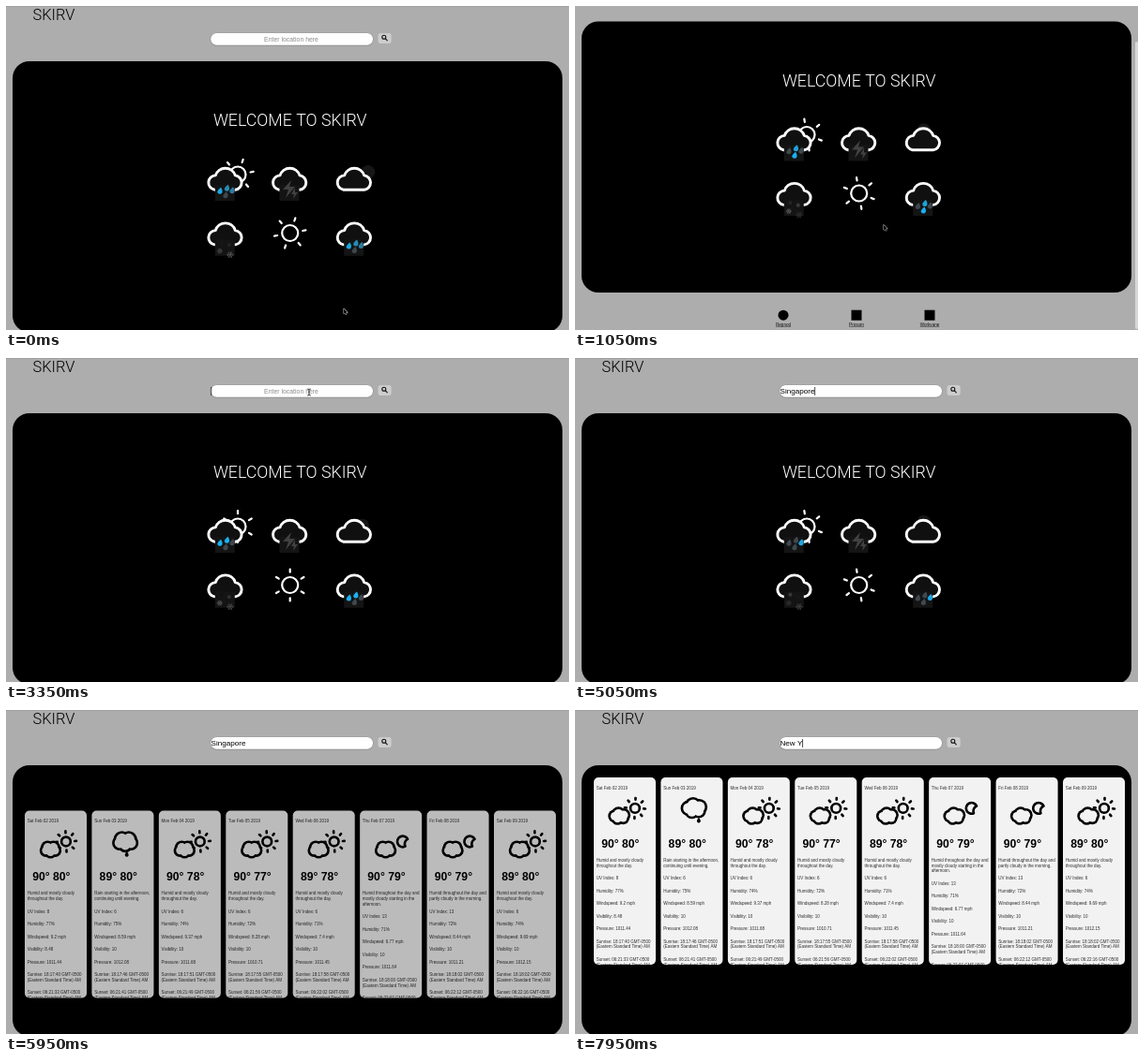
Recreate the animation shown at these times as an HTML page with a canvas. Size 600x346 px, loop 8000 ms.

```html
<!DOCTYPE html>
<html lang="en">
<head>
<meta charset="utf-8">
<title>Weather search</title>
<style>
html, body { margin: 0; width: 100%; height: 100%; overflow: hidden; background: #adadad; }
canvas { display: block; width: 600px; height: 346px; }
</style>
</head>
<body>
<canvas id="stage"></canvas>
<script>
const LOOP = 8000, TAU = Math.PI * 2;
const SANS = '"Liberation Sans", Arial, sans-serif', LIGHT = 'Roboto, sans-serif';
const NAME = 'SKIRV';
const canvas = document.getElementById('stage');
const ratio = window.devicePixelRatio || 1;
canvas.width = 600 * ratio;
canvas.height = 346 * ratio;
const ctx = canvas.getContext('2d');

const CLEAR = ['Humid and mostly cloudy', 'throughout the day.'];
const DAYS = [
  // date, icon, high, low, summary, uv, humidity, wind, visibility, pressure, sunrise, sunset
  ['Sat Feb 02', 'sun', 90, 80, CLEAR, 8, 77, 9.2, 8.48, 1011.44, '17:40', '21:33'],
  ['Sun Feb 03', 'rain', 89, 80, ['Rain starting in the afternoon,', 'continuing until evening.'], 6, 75, 8.59, 10, 1012.08, '17:46', '21:41'],
  ['Mon Feb 04', 'sun', 90, 78, CLEAR, 6, 74, 9.37, 10, 1011.68, '17:51', '21:49'],
  ['Tue Feb 05', 'sun', 90, 77, CLEAR, 6, 72, 8.28, 10, 1010.71, '17:55', '21:56'],
  ['Wed Feb 06', 'sun', 89, 78, CLEAR, 6, 71, 7.4, 10, 1011.45, '17:58', '22:02'],
  ['Thu Feb 07', 'moon', 90, 79, ['Humid throughout the day and', 'mostly cloudy starting in the', 'afternoon.'], 13, 71, 6.77, 10, 1011.64, '18:00', '22:07'],
  ['Fri Feb 08', 'moon', 90, 79, ['Humid throughout the day and', 'partly cloudy in the morning.'], 13, 72, 8.44, 10, 1011.21, '18:02', '22:12'],
  ['Sat Feb 09', 'sun', 89, 80, CLEAR, 6, 74, 9.69, 10, 1012.15, '18:02', '22:16'],
];

const clamp = (v, lo = 0, hi = 1) => Math.min(hi, Math.max(lo, v));
const smooth = (t, from, to) => { const p = clamp((t - from) / (to - from)); return p * p * (3 - 2 * p); };

// cubic-bezier(.25, .1, .25, 1)
function ease(x) {
  let lo = 0, hi = 1;
  for (let i = 0; i < 20; i++) {
    const u = (lo + hi) / 2;
    if (.75 * u * (1 - u) + u * u * u < x) lo = u; else hi = u;
  }
  return .3 * lo * (1 - lo) ** 2 + 3 * lo * lo * (1 - lo) + lo ** 3;
}

function text(str, x, y, font, color, align = 'left') {
  ctx.font = font;
  ctx.fillStyle = color;
  ctx.textAlign = align;
  ctx.fillText(str, x, y);
}
function box(x, y, w, h, r, color) {
  ctx.beginPath();
  ctx.roundRect(x, y, w, h, r);
  ctx.fillStyle = color;
  ctx.fill();
}
function disc(x, y, r, color) {
  ctx.beginPath();
  ctx.arc(x, y, r, 0, TAU);
  ctx.fillStyle = color;
  ctx.fill();
}
function pen(color, width, cap = 'round') {
  ctx.strokeStyle = color;
  ctx.lineWidth = width;
  ctx.lineCap = cap;
  ctx.lineJoin = 'round';
}
function at(x, y, draw) {
  ctx.save();
  ctx.translate(x, y);
  draw();
  ctx.restore();
}
function sunShape(x, y, r, inner, outer, count, turn) {
  ctx.beginPath();
  ctx.arc(x, y, r, 0, TAU);
  for (let i = 0; i < count; i++) {
    const a = turn + i / count * TAU, c = Math.cos(a), s = Math.sin(a);
    ctx.moveTo(x + c * inner, y + s * inner);
    ctx.lineTo(x + c * outer, y + s * outer);
  }
  ctx.stroke();
}

// Welcome icons
const CLOUD = new Path2D('M-11 9.2A7.7 7.7 0 0 1-10-6.1A11 11 0 0 1 11-6.1A7.7 7.7 0 0 1 11 9.2Z');
const DROP = new Path2D('M1.2-4.2C2.6-1.8 3.1-.6 2.6 1.2A2.8 2.8 0 0 1-2.6.8C-2.4-1-.8-2.4 1.2-4.2Z');
const BOLT = new Path2D('M2-1L-7 9H-1L-4 18L6 6H0ZM6 7L2 14H5L4 19L9 12H6Z');
// x, y, pulse centre, pulse width
const DROPS = [[-5.5, 11, 300, 500], [2, 8, 600, 700], [7.5, 10.5, 2400, 600], [.5, 15.5, 1200, 500]];
const FLAKES = [[-5.5, 16, 2.7], [5.5, 20, 3.4], [-4, 7, 1.8], [4.5, 9.5, 1.8]];

function cloud() {
  ctx.fillStyle = '#101010';
  ctx.fill(CLOUD);
  pen('#fff', 2.9);
  ctx.stroke(CLOUD);
}
function tray() {
  ctx.fillStyle = '#141414';
  ctx.fillRect(-10.5, 4, 21, 17);
}
function whiteSun(x, y, t) {
  pen('#fff', 2.2);
  sunShape(x, y, 8.5, 13.8, 17, 6, (19.5 + 30 * t / 1000 - 90) / 360 * TAU);
}
function rainCloud(t) {
  cloud();
  tray();
  for (const [x, y, peak, width] of DROPS) {
    const gap = Math.abs((t - peak + 4500) % 3000 - 1500);
    const level = clamp(1.5 - gap / width);
    at(x, y, () => {
      ctx.fillStyle = `rgb(${62 - 36 * level},${72 + 104 * level},${78 + 162 * level})`;
      ctx.fill(DROP);
    });
  }
}
function snowCloud(t) {
  cloud();
  tray();
  FLAKES.forEach(([x, y, r], i) => {
    const level = 50 + 22 * Math.sin(t / 3000 * TAU + i * 2) + (i < 2 ? 20 : -8);
    pen(`rgb(${level},${level},${level})`, .7);
    ctx.beginPath();
    for (let k = 0; k < 6; k++) {
      const c = Math.cos(k * TAU / 6), s = Math.sin(k * TAU / 6);
      ctx.moveTo(x, y);
      ctx.lineTo(x + c * r, y + s * r);
      ctx.moveTo(x + c * r * .7 - s * .8, y + s * r * .7 + c * .8);
      ctx.lineTo(x + c * r * .7 + s * .8, y + s * r * .7 - c * .8);
    }
    ctx.stroke();
  });
}
function welcome(t) {
  text('WELCOME TO ' + NAME, 302.7, 128, '300 17.8px ' + LIGHT, '#fff', 'center');
  whiteSun(247, 180, t);
  at(233.3, 187, () => rainCloud(t));
  at(302, 187, () => {
    cloud();
    tray();
    ctx.fillStyle = '#414141';
    ctx.fill(BOLT);
  });
  const orbit = t / 4000 * TAU;
  disc(372.7 + 13 * Math.cos(orbit), 177.5 - 2 * Math.sin(orbit), 7.5, '#161616');
  at(370.7, 187, cloud);
  at(233.3, 245.7, () => snowCloud(t));
  whiteSun(302.7, 242.5, t);
  at(370.7, 245.7, () => rainCloud(t));
}

// Forecast icons, drawn in a 66 by 33 area
const CARD = '#f2f2f2', SIZE = 33, LINE = SIZE * .08;

function puffs(t, x, y, w, inset, color) {
  const small = w * .24 - inset, grow = w * .04;
  for (let i = 0; i < 5; i++) {
    const a = (t / 30000 + i / 5) * TAU, c = Math.cos(a), s = Math.sin(a);
    disc(x - s * w * .21, y + c * w * .12 + grow / 2, small + (1 - c * .5) * grow, color);
  }
}
function puffCloud(t, x, y, w) {
  puffs(t, x, y, w, 0, '#000');
  puffs(t, x, y, w, LINE, CARD);
}
function moon(t, x, y, w) {
  const r = w * .29 - LINE / 2, c = Math.cos(t / 15000 * TAU), a = -c * TAU / 16;
  x += c * w * .05;
  ctx.beginPath();
  ctx.arc(x, y, r, a + TAU / 8, a + TAU * 7 / 8);
  ctx.arc(x + Math.cos(a) * r * Math.SQRT2, y + Math.sin(a) * r * Math.SQRT2, r, a + TAU * 5 / 8, a + TAU * 3 / 8, true);
  ctx.closePath();
  ctx.stroke();
}
function rainDrops(t, x, y, w) {
  ctx.fillStyle = '#000';
  [-1, 1 / 3, -1 / 3, 1].forEach((side, i) => {
    const p = (t / 1350 + i / 4) % 1, dx = x + side * w * .16, dy = y + p * p * w;
    ctx.beginPath();
    ctx.moveTo(dx, dy - LINE * 1.5);
    ctx.arc(dx, dy, LINE * .75, TAU * 11 / 12, TAU * 7 / 12);
    ctx.fill();
  });
}
function forecastIcon(kind, t) {
  ctx.beginPath();
  ctx.rect(0, 0, 66, SIZE);
  ctx.clip();
  pen('#000', LINE);
  const w = SIZE * .75;
  if (kind === 'rain') {
    rainDrops(t, 33, SIZE * .37, SIZE * .9);
    puffCloud(t, 33, SIZE * .37, SIZE * .9);
    return;
  }
  if (kind === 'sun') {
    sunShape(66 * .625, SIZE * .375, w * .25 - LINE / 2, w * .32 + LINE / 2, w * .5 - LINE / 2, 8, (t - 7000) / 120000 * TAU);
  } else {
    moon(t, 66 * .667, SIZE * .375, w);
  }
  puffCloud(t, 66 * .375, SIZE * .625, w);
}

function card(day, t) {
  const [date, icon, high, low, summary, uv, humidity, wind, visibility, pressure, rise, set] = day;
  box(0, 0, 66, 200, 5, CARD);
  ctx.clip();
  at(2.7, 20.5, () => forecastIcon(icon, t + 55));
  const small = (str, y) => text(str, 2.7, y, '4.5px ' + SANS, '#2c2c2c');
  small(date + ' 2019', 12.6);
  text(`${high}° ${low}°`, 28.3, 74.8, 'bold 12.2px ' + SANS, '#000', 'center');
  let y = 89.8;
  const zone = '(Eastern Standard Time) AM';
  for (const lines of [
    summary, [`UV Index: ${uv}`], [`Humidity: ${humidity}%`], [`Windspeed: ${wind} mph`],
    [`Visibility: ${visibility}`], [`Pressure: ${pressure}`],
    [`Sunrise: 18:${rise} GMT-0500`, zone], [`Sunset: 06:${set} GMT-0500`, zone],
  ]) {
    lines.forEach((str, i) => small(str, y + i * 5.8));
    y += 13.5 + (lines.length - 1) * 5.8;
  }
}
function forecast(t) {
  const shown = ease(clamp((t - 5480) / 1000));
  ctx.save();
  ctx.beginPath();
  ctx.rect(7, 59, 586, 287);
  ctx.clip();
  DAYS.forEach((day, i) => at(20 + i * 71.43, 72 + 156 * (1 - shown), () => card(day, t)));
  // Over the black panel, a black veil equals fading the cards
  ctx.fillStyle = `rgba(0,0,0,${1 - shown})`;
  ctx.fillRect(19, 71, 568, 275);
  ctx.restore();
}

// Search field
const typed = (word, t, start, step) => word.slice(0, clamp(Math.floor((t - start) / step) + 1, 0, word.length));

function search(t) {
  box(217.6, 28.7, 173.8, 13.7, 6.5, '#888');
  box(218.2, 29, 172.8, 12.8, 6.2, '#fff');
  const again = t >= 7350;
  const value = again ? typed('New York', t, 7350, 135) : typed('Singapore', t, 4080, 115);
  const font = '8.1px ' + SANS;
  ctx.font = font;
  const width = ctx.measureText(value).width;
  if (t >= 6900 && !again) {
    ctx.fillStyle = '#b3d7ff';
    ctx.fillRect(218.5, 30.5, width, 10);
  }
  if (value) text(value, 218.5, 38.4, font, '#000');
  else text('Enter location here', 304, 38.2, '6.9px ' + SANS, '#8a8a8a', 'center');
  if (t > 3250 && t < 5480 || again) {
    ctx.fillStyle = '#000';
    ctx.fillRect(218.5 + width, 31, .7, 9);
  }
  box(396.5, 29, 14.2, 11, 3, '#cdcdcd');
  pen('#111', 1.1);
  ctx.beginPath();
  ctx.arc(402.8, 33.3, 2, 0, TAU);
  ctx.moveTo(404.4, 34.9);
  ctx.lineTo(406.3, 36.8);
  ctx.stroke();
}

function footer() {
  disc(222, 372.7, 5.5, '#000');
  box(294.5, 367.2, 11, 11, 0, '#000');
  box(372.5, 367.2, 11, 11, 0, '#000');
  ['Repnod', 'Prosum', 'Workvane'].forEach((label, i) => {
    const x = 222 + 78 * i;
    text(label, x, 384.4, '4.6px ' + SANS, '#111', 'center');
    const w = ctx.measureText(label).width;
    ctx.fillRect(x - w / 2, 385, w, .4);
  });
}

function pointer(t) {
  if (t > 4080) return;
  const first = smooth(t, 50, 400), second = smooth(t, 2600, 3200);
  const x = 360 - 31 * first - 6 * second, y = 323.5 - 89.5 * first - 198 * second;
  at(x, y, () => {
    if (y < 42) {
      pen('#111', .8);
      ctx.stroke(new Path2D('M-1.5-3Q0-3 0-2Q0-3 1.5-3M0-2V3M-1.5 4Q0 4 0 3Q0 4 1.5 4'));
    } else {
      const arrow = new Path2D('M0 0V5.2L1.2 4.2L2 6L3 5.6L2.2 3.8H3.7Z');
      pen('#ddd', .9);
      ctx.stroke(arrow);
      ctx.fillStyle = '#000';
      ctx.fill(arrow);
    }
  });
}

function draw(t) {
  ctx.setTransform(ratio, 0, 0, ratio, 0, 0);
  ctx.fillStyle = '#adadad';
  ctx.fillRect(0, 0, 600, 346);
  const scrolled = smooth(t, 450, 900) - smooth(t, 1550, 1980);
  at(0, -42.5 * scrolled, () => {
    ctx.fillStyle = '#9a9a9a';
    ctx.fillRect(0, 0, 600, .7);
    text(NAME, 28.5, 15.3, '300 16.4px ' + LIGHT, '#000');
    search(t);
    box(7, 59, 586, 289.5, 18, '#000');
    if (t < 5350) welcome(t);
    else if (t >= 5480) forecast(t);
    footer();
  });
  const bar = smooth(t, 430, 500) * (1 - smooth(t, 2550, 2850));
  if (bar) box(597, 38 * scrolled, 3, 307, 1.5, `rgba(215,215,215,${bar})`);
  pointer(t);
}

function tick() {
  draw(performance.now() % LOOP);
  requestAnimationFrame(tick);
}
tick();
</script>
</body>
</html>
```
